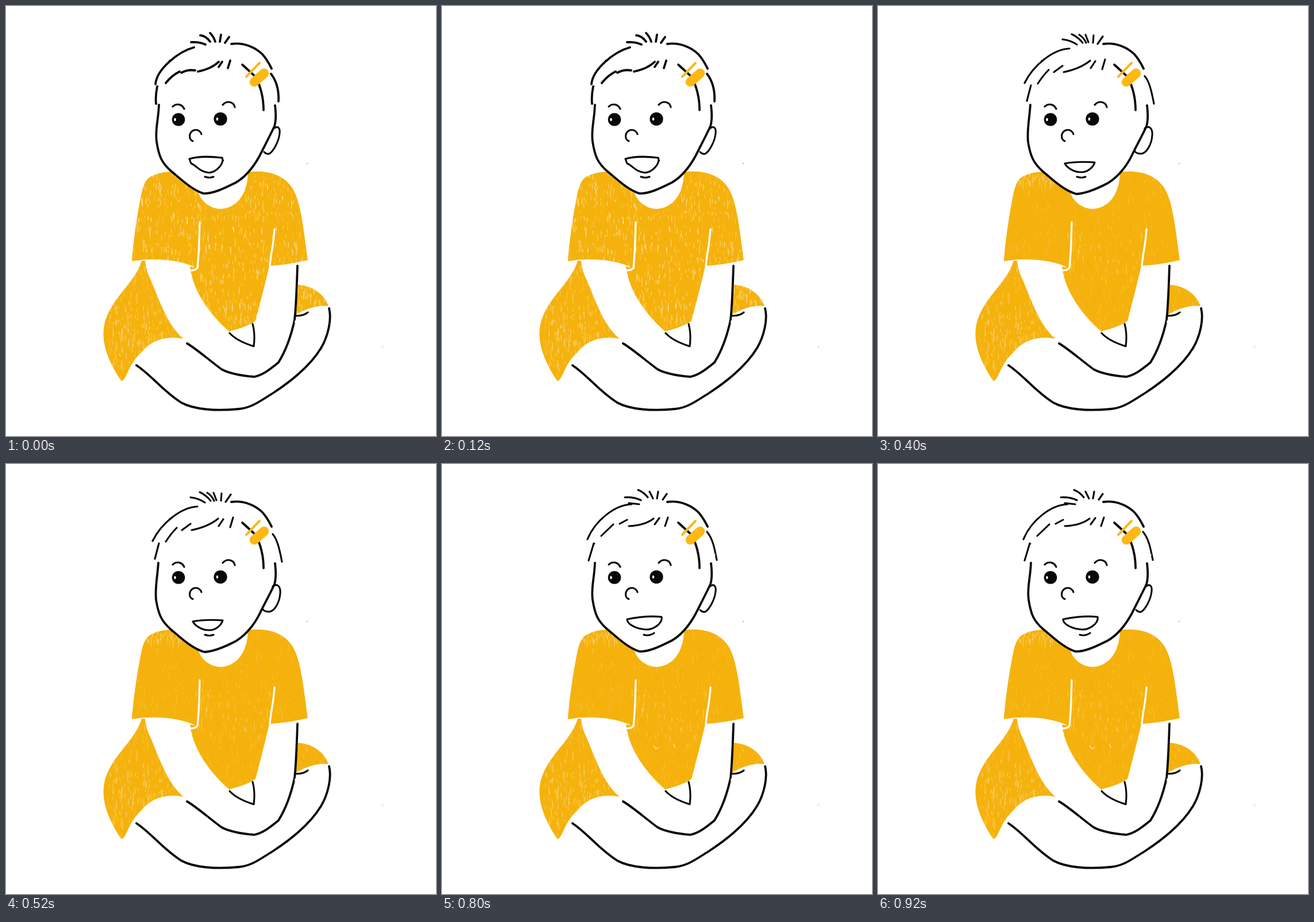
Recreate the animation shown at these times as an HTML page. Size 748 by 748 pixels, loop 1000 ms.

```html
<!DOCTYPE html>
<html lang="en">
<head>
<meta charset="utf-8">
<title>Sitting baby</title>
<style>
  html, body { margin: 0; width: 100%; height: 100%; overflow: hidden; background: #fff; }
  svg { display: block; width: 100vw; height: 100vh; }
  .cloth { fill: #f5b20d; }
  .ink { fill: none; stroke: #080808; stroke-width: 3.8; stroke-linecap: round; stroke-linejoin: round; }
  .thin { stroke-width: 3.1; }
  .gap { fill: none; stroke: #fff; stroke-width: 3.2; stroke-linecap: round; stroke-linejoin: round; }
  .pose { animation: show 1s step-end infinite; animation-delay: calc(var(--n) * 200ms - 1s); }
  @keyframes show {
    0% { visibility: visible; }
    20%, 100% { visibility: hidden; }
  }
</style>
</head>
<body>
<svg viewBox="0 0 748 748">
  <defs>
    <filter id="rough" filterUnits="userSpaceOnUse" x="0" y="0" width="748" height="748" color-interpolation-filters="sRGB">
      <feTurbulence type="fractalNoise" baseFrequency=".11" numOctaves="2" seed="4"/>
      <feDisplacementMap in="SourceGraphic" scale="1.4" xChannelSelector="R" yChannelSelector="G"/>
    </filter>
    <path id="shirt" d="M247 300C258 292 272 289 286 288C300 299 316 314 335 325C340 342 358 353 373 353C398 352 420 332 421 289C446 285 476 290 492 309C512 329 516 378 525 442C503 447 481 451 458 452C450 487 442 517 434 548C424 555 405 562 388 566C356 538 325 497 320 453L330 455C304 441 255 437 219 444C221 412 229 355 237 320C240 310 243 304 247 300Z"/>
    <path id="skirt" d="M236 443C226 477 192 503 179 532C162 565 167 602 201 653C211 648 211 626 235 603C252 581 280 573 309 579C281 556 266 510 252 477C246 465 243 455 242 443Z"/>
    <path id="hem" d="M508 485C530 486 553 499 561 522C541 519 520 528 504 537Z"/>
    <clipPath id="inShirt"><use href="#shirt"/></clipPath>
    <clipPath id="inSkirt"><use href="#skirt"/><use href="#hem"/></clipPath>
  </defs>

  <g class="cloth" filter="url(#rough)">
    <use href="#shirt"/><use href="#skirt"/><use href="#hem"/>
  </g>
  <g id="skirtChalk" clip-path="url(#inSkirt)"></g>
  <g id="shirtChalk" clip-path="url(#inShirt)"></g>

  <g class="gap" filter="url(#rough)">
    <path d="M337 376C336 405 336 430 333 455C331 459 327 460 322 460"/>
    <path d="M467 388C466 412 461 428 459 452"/>
  </g>

  <g class="ink" filter="url(#rough)">
    <path d="M507 452C506 480 505 518 502 546C496 574 487 599 474 620C457 634 446 642 432 645C407 643 388 639 375 632C352 615 332 597 315 587"/>
    <path class="thin" d="M389 569C400 581 415 587 431 592C433 576 432 564 429 553M504 539C513 539 520 537 525 533"/>
    <path d="M392 66C415 63 435 73 446 84C455 94 459 103 462 109"/>
    <path d="M411 102L434 123C444 142 448 162 448 181"/>
    <path class="thin" d="M290 175C296 169 306 170 310 179M377 172C384 164 396 166 398 176"/>
    <path class="thin" d="M325 235C317 232 318 219 327 216C334 214 339 219 340 223"/>
  </g>

  <g fill="none" stroke="#fdb813" stroke-linecap="round">
    <path stroke-width="4" d="M418 123L441 99"/>
    <path stroke-width="16.5" d="M432 132L449 117"/>
  </g>

  <g fill="#080808">
    <circle cx="300" cy="197.5" r="11.3"/>
    <circle cx="373" cy="196.5" r="11.6"/>
  </g>
  <g fill="#fff">
    <ellipse cx="294" cy="197.5" rx="1.8" ry="2.7"/>
    <ellipse cx="367.5" cy="196.5" rx="1.8" ry="2.7"/>
  </g>
  <circle cx="524" cy="274" r="1.2" fill="#bbb"/>
  <circle cx="655" cy="593" r="2.3" fill="#eee"/>

  <g id="poses" filter="url(#rough)"></g>
</svg>
<script>
const $ = id => document.getElementById(id);

const tufts = [
  "M322 63Q336 62 347 67M338 51Q348 52 355 62M355 47Q361 53 364 62M374 50L372 62M388 54L381 64",
  "M318 58Q334 57 346 63M325 68L343 70M341 45Q351 49 358 58M361 48L367 60M376 48L374 60M391 52L384 62",
  "M321 58Q336 60 346 67M337 49Q348 54 356 64M350 50Q358 55 362 64M361 50L366 63M375 51L374 64M391 53L382 66"
];
const crowns = [
  "M327 72C300 79 262 110 260 136M263 140C261 150 260 160 261 170M461 118C471 131 475 146 474 166",
  "M330 70C300 71 266 99 253 131M264 138L255 168M461 118C471 130 474 146 478 167",
  "M333 74C305 75 270 103 255 134M266 138L259 165M464 122C472 131 476 149 480 170"
];
const faces = [
  "M266 172C265 200 259 215 262 236C266 262 271 273 287 287C303 300 322 319 343 326C360 327 380 317 400 307C417 297 430 281 441 261C449 245 458 228 467 209C471 195 469 183 468 173",
  "M265 172C263 200 259 215 261 236C265 262 271 274 287 288C303 301 323 321 345 327C362 326 381 318 400 308C418 297 433 278 442 259C450 242 459 227 467 209C471 195 469 183 468 173"
];
const ears = [
  "M466 213C472 208 477 211 476 221C475 235 465 253 458 257C455 258 452 257 449 254",
  "M464 213C471 207 478 212 477 225C476 241 467 256 458 257C453 257 449 256 447 253"
];
const legs = [
  "M562 526C567 545 560 575 548 595C530 625 500 650 465 673C441 688 427 699 405 701C365 705 327 702 305 690C272 669 255 644 227 625",
  "M562 526C567 545 560 575 548 595C530 625 500 650 466 673C445 688 428 696 405 700C370 705 335 700 308 688C280 673 250 650 224 622"
];

const poses = [
  { hair: 0, face: 0, ear: 0, leg: 0,
    fringe: "M278 134Q288 121 302 114M305 116Q316 110 329 112M334 114Q358 109 370 97M376 97L370 106M390 95L386 108",
    mouth: "M319 266C335 261 360 262 376 264C380 273 367 289 353 290C337 289 331 277 322 274ZM346 297Q354 300 361 297" },
  { hair: 1, face: 0, ear: 0, leg: 1,
    fringe: "M299 104Q283 116 271 132M322 97L309 104M316 110Q352 108 368 95M378 94L370 105M393 93L388 108",
    mouth: "M321 270C335 266 362 265 378 267C379 278 365 289 354 290C340 291 322 280 321 270ZM347 297Q354 300 361 297" },
  { hair: 2, face: 1, ear: 1, leg: 0,
    fringe: "M297 111Q287 121 278 135M321 104L306 115M323 115Q352 109 369 95M378 96L370 108M395 93L390 110",
    mouth: "M325 274C340 271 362 271 377 272C374 282 363 289 355 289C340 290 328 280 325 274ZM346 297Q354 300 361 297" },
  { hair: 2, face: 0, ear: 1, leg: 0,
    fringe: "M298 105L272 132M322 98L308 109M326 109Q353 107 368 94M378 96L370 108M395 93L390 110",
    mouth: "M320 266C340 266 362 264 380 264C382 272 370 283 360 283C340 284 318 278 320 266ZM348 295L363 294" },
  { hair: 1, face: 0, ear: 0, leg: 0,
    fringe: "M298 105L277 125M322 97L309 104M325 108Q352 107 368 95M378 94L370 105M393 93L388 108",
    mouth: "M322 270C342 266 365 264 382 266C384 276 370 288 355 288C340 287 322 280 322 270ZM351 297Q360 300 369 294" }
];

const line = (d, thin) => `<path class="ink${thin ? " thin" : ""}" d="${d}"/>`;
const pose = (n, body) => `<g class="pose" style="--n:${n}">${body}</g>`;

$("poses").innerHTML = poses.map((p, n) => pose(n,
  line(faces[p.face] + legs[p.leg]) +
  line(crowns[p.hair] + tufts[p.hair] + p.fringe, p.hair > 0) +
  line(ears[p.ear] + p.mouth, true))).join("");

function random(seed) {
  return () => {
    seed = (seed * 1664525 + 1013904223) >>> 0;
    return seed / 4294967296;
  };
}

// Short vertical chalk marks; band > 0 gathers them into rows that far apart.
function chalk(seed, count, [x, y, w, h], alpha, band = 0) {
  const rnd = random(seed);
  let d = "";
  for (let i = 0; i < count; i++) {
    const px = x + rnd() * w;
    let py = y + rnd() * h;
    if (band) py = Math.round(py / band) * band + (rnd() + rnd() - 1) * band * .5 + Math.sin(px / 40) * 4;
    const len = 3 + rnd() * rnd() * 13;
    d += `M${px.toFixed(1)} ${py.toFixed(1)}l${(rnd() - .4).toFixed(1)} ${len.toFixed(1)}`;
  }
  return `<path d="${d}" fill="none" stroke="#fff" stroke-linecap="round" opacity="${alpha}"/>`;
}

const shirtBox = [218, 286, 310, 282];
const heavy = chalk(11, 620, shirtBox, .5, 26) + chalk(5, 400, shirtBox, .25);
const light = chalk(23, 450, shirtBox, .17) + chalk(8, 60, [238, 290, 110, 16], .4) +
  chalk(31, 60, [320, 385, 140, 90], .35);
$("shirtChalk").innerHTML = pose(0, heavy) + [1, 2, 3, 4].map(n => pose(n, light)).join("") +
  pose(4, '<path fill="none" stroke="#fff" stroke-width="1.3" opacity=".7" d="M368 490q4 8 9 3M403 487l2 7"/>');

const skirtBox = [165, 445, 145, 210], hemBox = [504, 485, 58, 50];
$("skirtChalk").innerHTML = chalk(17, 280, skirtBox, .28) + chalk(3, 80, [175, 520, 110, 90], .42) +
  chalk(9, 16, hemBox, .25) + pose(0, chalk(41, 110, skirtBox, .35) + chalk(12, 45, hemBox, .5));
</script>
</body>
</html>
```
